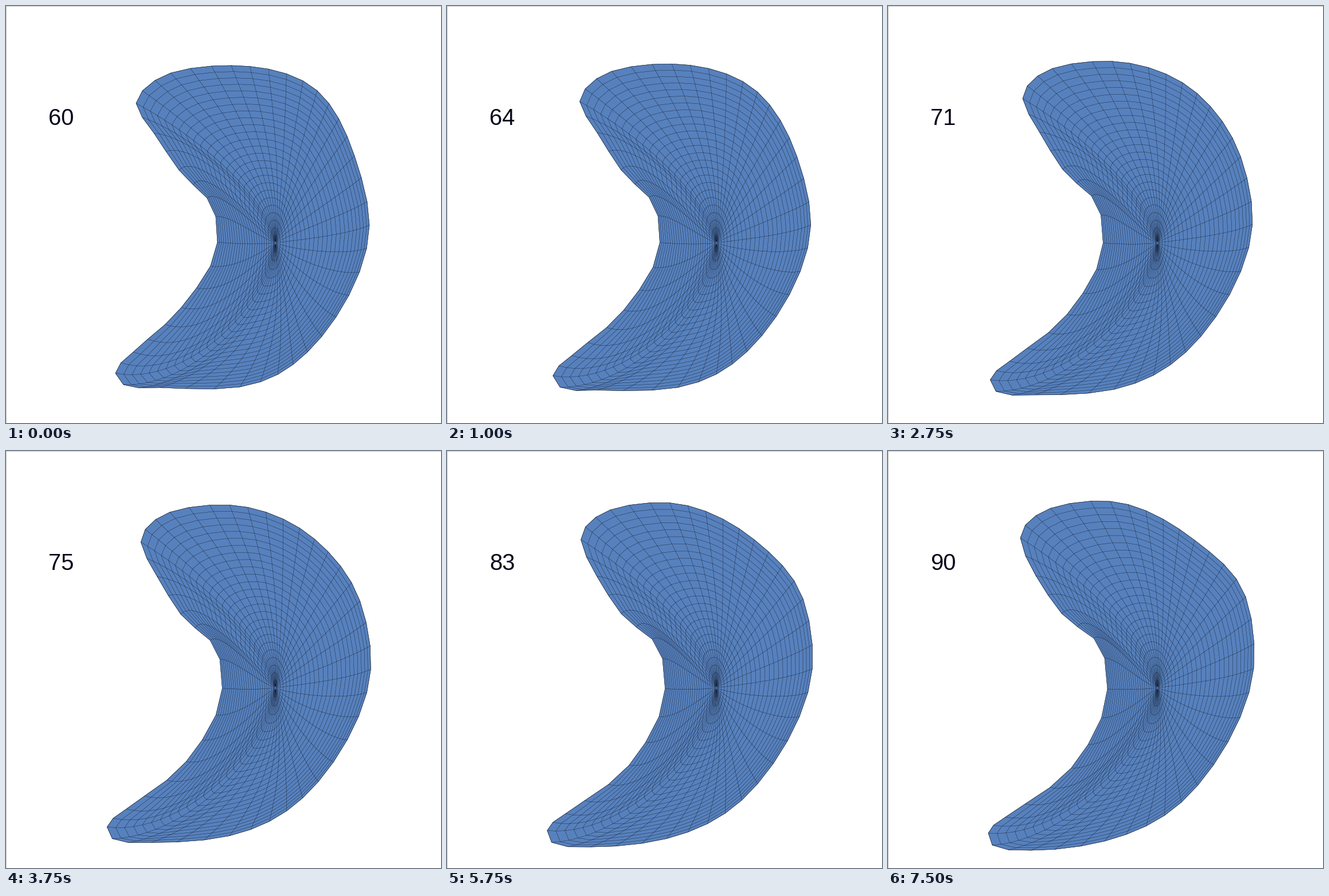
Recreate the animation shown at these times as a matplotlib script. Size 759 by 729 pixels, loop 7.75 s.

```python
import numpy as np
import matplotlib.pyplot as plt
from matplotlib.animation import FuncAnimation
from matplotlib.collections import LineCollection
from matplotlib.patches import Polygon, Rectangle

W, H, DPI = 759, 729, 100
PX = 72 / DPI
FRAMES, INTERVAL = 31, 250
SPOKES, RINGS = 50, 25
POLE = np.array([470, 414])

# Key points of the silhouette: spoke, x, y and the total drift in x and y
KEYS = np.array([
    (0, 227, 170, 4, -18), (2, 260, 130, -2, -17), (6, 393, 104, -5, -16),
    (11, 543, 148, -8, 8), (15, 608, 262, 16, -7), (18, 634, 383, 4, -3),
    (24, 526, 605, -14, 9), (28, 408, 666, -30, 16), (31, 268, 667, -19, 31),
    (33, 205, 662, -23, 27), (34, 191, 642, -16, 26), (36, 222, 605, -17, 35),
    (39, 306, 527, 14, 27), (42, 369, 413, 14, 3), (43, 366, 368, 12, -6),
    (46, 302, 287, 1, -3), (48, 258, 222, 0, -4)], float)

index = np.arange(SPOKES)


def closed_spline(knots, values):
    """Smooth closed curve through the knots, sampled at every spoke."""
    step = np.diff(np.append(knots, knots[0] + SPOKES))[:, None]
    rise = (np.roll(values, -1, axis=0) - values) / step
    step0, rise0 = np.roll(step, 1, axis=0), np.roll(rise, 1, axis=0)
    slope = (rise0 * step + rise * step0) / (step + step0)

    a = np.searchsorted(knots, index, side="right") - 1
    b = (a + 1) % len(knots)
    h = step[a]
    t = (index - knots[a])[:, None] / h
    s = 1 - t
    return (s * s * ((1 + 2 * t) * values[a] + t * h * slope[a])
            + t * t * ((1 + 2 * s) * values[b] - s * h * slope[b]))


def bump(center, width):
    """Bell curve over the spokes, wrapping round the outline."""
    d = (index - center + SPOKES / 2) % SPOKES - SPOKES / 2
    return np.exp(-(d / width) ** 2 / 2)


START = closed_spline(KEYS[:, 0], KEYS[:, 1:3])
DRIFT = closed_spline(KEYS[:, 0], KEYS[:, 3:5])

# Both tips and the back swing out and return during the drift
SWAY = np.column_stack([7 * bump(49, 2) - 6 * bump(33, 2),
                        5 * bump(14.5, 2) - 4 * bump(25, 4)])

# Spoke directions leave the pole on a tall, narrow ellipse
angle = np.interp(index, [-7.8, 18.3, 42.2, 68.3],
                  [-np.pi, 0, np.pi, 2 * np.pi])
height = np.where(np.sin(angle) > 0, 135, 110)
INNER = POLE + np.column_stack([30 * np.cos(angle), height * np.sin(angle)])

PULL = (0.45 - 0.17 * bump(18, 5) - 0.27 * bump(45, 1.5))[:, None]
BEND = np.column_stack([0 * index, 80 * bump(35.5, 3.2)
                        - 55 * bump(46.3, 2.3) + 14 * bump(20, 2.5)])


def outline(i):
    x = i / (FRAMES - 1)
    drift = x + 0.1 * np.sin(np.pi * x)
    sway = np.sin(np.pi * x ** 0.75)
    return START + drift * DRIFT + sway * SWAY


def mesh(edge, t):
    """Grid of points [ring, spoke, xy] on cubic curves from the pole."""
    outer = edge + PULL * (INNER - edge) + BEND
    t = t[:, None, None]
    s = 1 - t
    return (s ** 3 * POLE + 3 * s * s * t * INNER
            + 3 * s * t * t * outer + t ** 3 * edge)


fig = plt.figure(figsize=((W + 0.001) / DPI, (H + 0.001) / DPI), dpi=DPI,
                 facecolor="white")
ax = fig.add_axes([0, 0, 1, 1])
ax.set_xlim(0, W)
ax.set_ylim(H, 0)
ax.axis("off")

for w, h in ((W, 1), (1, H)):
    ax.add_patch(Rectangle((0, 0), w, h, color="#c4c4c4", lw=0,
                           antialiased=False))

body = Polygon(START, closed=True, facecolor="#5781bd",
               edgecolor="#1f2c44", lw=0.6 * PX, zorder=2)
ax.add_patch(body)
wires = LineCollection([], colors="#141e30", linewidths=0.42 * PX, zorder=3)
ax.add_collection(wires)
label = ax.text(74, 208, "", family="Liberation Sans", fontsize=40 * PX,
                color="#06061a", ha="left", va="baseline", zorder=4)

# The first row only carries the spokes closer to the pole
LEVELS = np.append(0.01, np.arange(1, RINGS + 1) / RINGS)


def draw(i):
    edge = outline(i)
    grid = mesh(edge, LEVELS)
    rings = np.concatenate([grid, grid[:, :1]], axis=1)[1:]
    body.set_xy(edge)
    wires.set_segments(list(rings) + list(grid.transpose(1, 0, 2)))
    label.set_text(str(60 + i))
    return body, wires, label


anim = FuncAnimation(fig, draw, frames=FRAMES, interval=INTERVAL,
                     repeat=True, repeat_delay=0)
plt.show()
```
